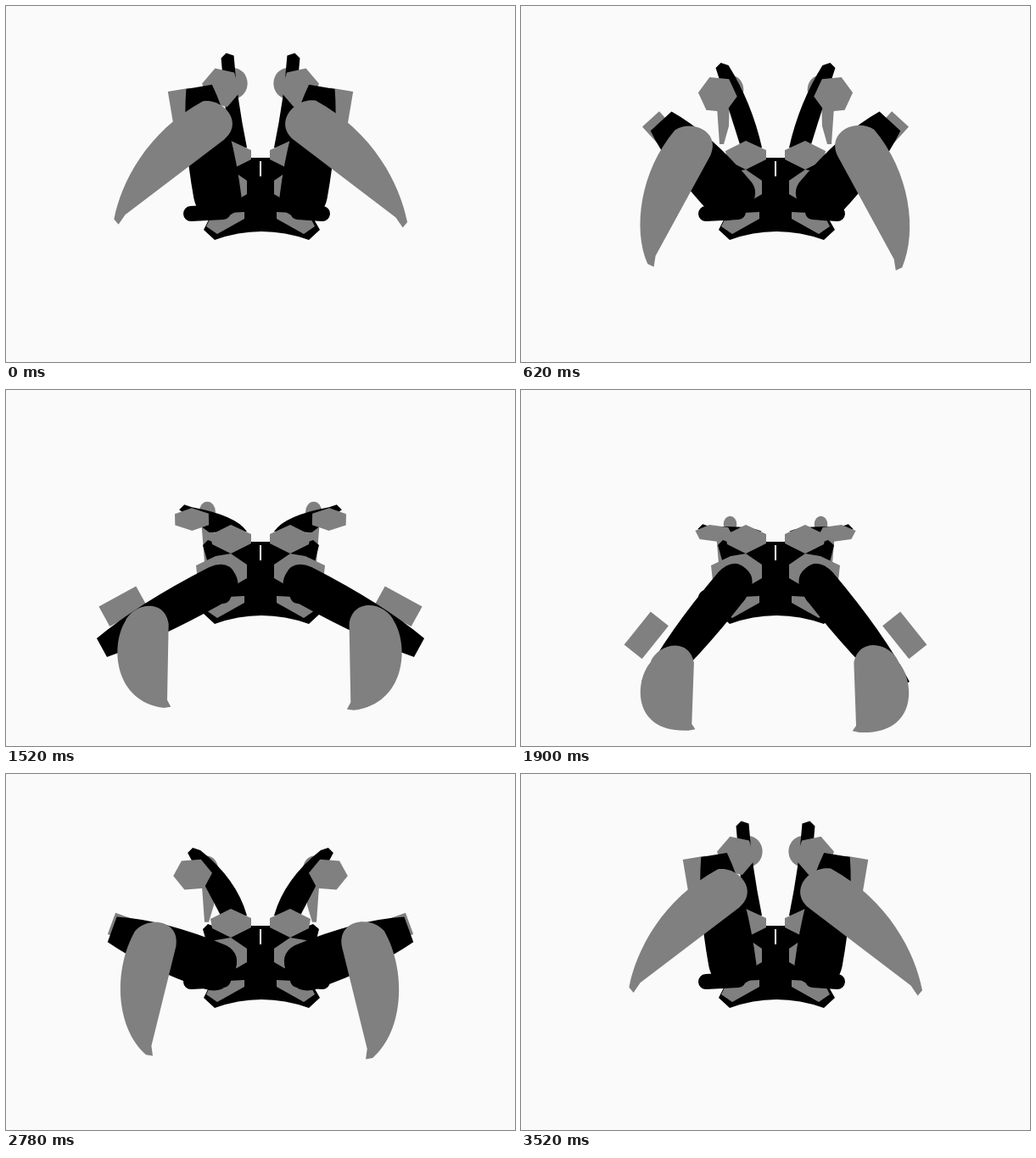
Write an HTML page with a canvas that moves like this. It is 600 by 420 pixels and loops after 3.54 s.

```html
<!DOCTYPE html>
<html>
<head>
<meta charset="utf-8">
<style>
html, body { margin: 0; width: 600px; height: 420px; overflow: hidden; background: #fafafa; }
canvas { display: block; }
</style>
</head>
<body>
<canvas id="stage" width="600" height="420"></canvas>
<script>
const ctx = document.getElementById('stage').getContext('2d');
const { sin, cos, PI } = Math;
const LOOP = 3540, BLACK = '#000', GRAY = '#808080', RAD = PI / 180;

const bodyShape = new Path2D('M232 183L238 177 246 180 290 179H312L354 180 362 177 369 183 361 215 362 250 370 264 357 276Q301 256 246 276L233 264 240 250 241 215Z');
const plates = new Path2D(
  'M236 260L249 269 281 251V243L262 244 240 252Z' +
  'M224 207L247 196 265 193 284 206V222L272 229 240 235 226 225Z' +
  'M241 171L265 159 289 170V181L265 193 243 182Z');
// Points along +x; 100 units from shoulder to end
const armShape = new Path2D('M100-15Q60-30 0-27Q-16-24-15 0Q-15 26 5 27Q60 28 100 15Z');

function fill(color, shape) {
  ctx.fillStyle = color;
  ctx.fill(shape);
}

function poly(color, ...points) {
  const p = new Path2D();
  points.forEach(([x, y]) => p.lineTo(x, y));
  p.closePath();
  fill(color, p);
}

function within(paint) {
  ctx.save();
  paint();
  ctx.restore();
}

// Paint the left half, then its mirror image
function bothSides(paint) {
  within(() => paint(false));
  within(() => {
    ctx.transform(-1, 0, 0, 1, 600, 0);
    paint(true);
  });
}

// Shoulder angle in degrees: a cosine whose phase is bent by small harmonics
function shoulder(time) {
  const w = 2 * PI * time / LOOP;
  const phase = w - 0.175 * (1 - cos(w)) - 0.035 * sin(w) + 0.087 * sin(2 * w);
  return 14.5 + 66 * cos(phase);
}

function rearLeg(angle) {
  const k = (0.8 * angle + 19) * RAD, lift = sin(k);
  const x = 268 - 56 * cos(k), y = 133 - 75 * lift;
  const boxX = x + 6 - 14 * lift, boxY = y + 16 + 22 * lift;

  const knee = new Path2D();
  knee.ellipse(x + 24 - 17 * lift, y + 7 + 26 * lift, 10 + 6 * lift, 12 + 6 * lift, 0, 0, 2 * PI);
  fill(GRAY, knee);

  const clawY = 200 - 44 * lift;
  poly(GRAY, [230, boxY], [246, boxY], [245, (boxY + clawY) / 2 + 8], [239, clawY], [234, clawY]);

  const arm = new Path2D();
  arm.moveTo(x - 8, y + 3);
  arm.lineTo(x - 2, y - 3);
  arm.lineTo(x + 7, y);
  arm.quadraticCurveTo(272, (y + 158) / 2, 284, 167);
  arm.lineTo(241 + 22 * lift, 168);
  fill(BLACK, arm);

  const turn = (40 * lift - 28) * RAD;
  const corners = [0, 1, 2, 3, 4, 5].map(i => {
    const a = turn + i * PI / 3;
    return [boxX + 23 * cos(a), boxY + (14 + 10 * lift) * sin(a)];
  });
  poly(GRAY, ...corners);
}

function hip(right) {
  ctx.strokeStyle = BLACK;
  ctx.lineWidth = 18;
  ctx.lineCap = 'round';
  ctx.beginPath();
  ctx.moveTo(right ? 227 : 218, 245);
  ctx.lineTo(256, 243);
  ctx.stroke();
}

function frontArm(angle) {
  const tilt = cos(2 * (angle - 47.6) * RAD);  // foreshortening
  ctx.translate(250, 229);
  ctx.scale(-1, 1);
  ctx.rotate(-angle * RAD);
  ctx.fillStyle = GRAY;
  ctx.fillRect(86, angle / 2 - 30, 50, 27);
  ctx.scale(1.42 - 0.16 * tilt, 0.97 + 0.15 * tilt);
  fill(BLACK, armShape);
}

function frontClaw(angle, right) {
  const x = 250 - 86 * cos((0.9 * angle + 12) * RAD);
  const y = 228 - 1.6 * angle + 0.0059 * angle ** 2;
  const swing = -6.8 + 0.376 * angle + 0.003 * angle ** 2;
  const len = 120 + 0.7 * angle - 0.0023 * angle ** 2;

  ctx.translate(x, y);
  // the right claw is slightly nearer
  if (right) ctx.transform(1.03, 0, 0, 1.03, 3, 0);
  ctx.rotate(swing * RAD);
  const claw = new Path2D();
  claw.moveTo(-6, len);
  claw.bezierCurveTo(len / 2 - 110, 0.77 * len, -48, len * (0.004 * len - 0.28), -24, -12);
  claw.bezierCurveTo(-9, -31, 29, -27, 25, 4);
  claw.lineTo(0, 0.92 * len);
  claw.lineTo(2, len + 1);
  fill(GRAY, claw);
}

function draw(time) {
  const angle = shoulder(time);
  ctx.fillStyle = '#fafafa';
  ctx.fillRect(0, 0, 600, 420);
  bothSides(() => rearLeg(angle));
  fill(BLACK, bodyShape);
  bothSides(right => {
    fill(GRAY, plates);
    hip(right);
    within(() => frontArm(angle));
    frontClaw(angle, right);
  });
  ctx.fillStyle = '#fff';
  ctx.fillRect(299, 183, 2, 18);
}

const start = performance.now();
function tick() {
  draw((performance.now() - start) % LOOP);
  requestAnimationFrame(tick);
}
tick();
</script>
</body>
</html>
```
